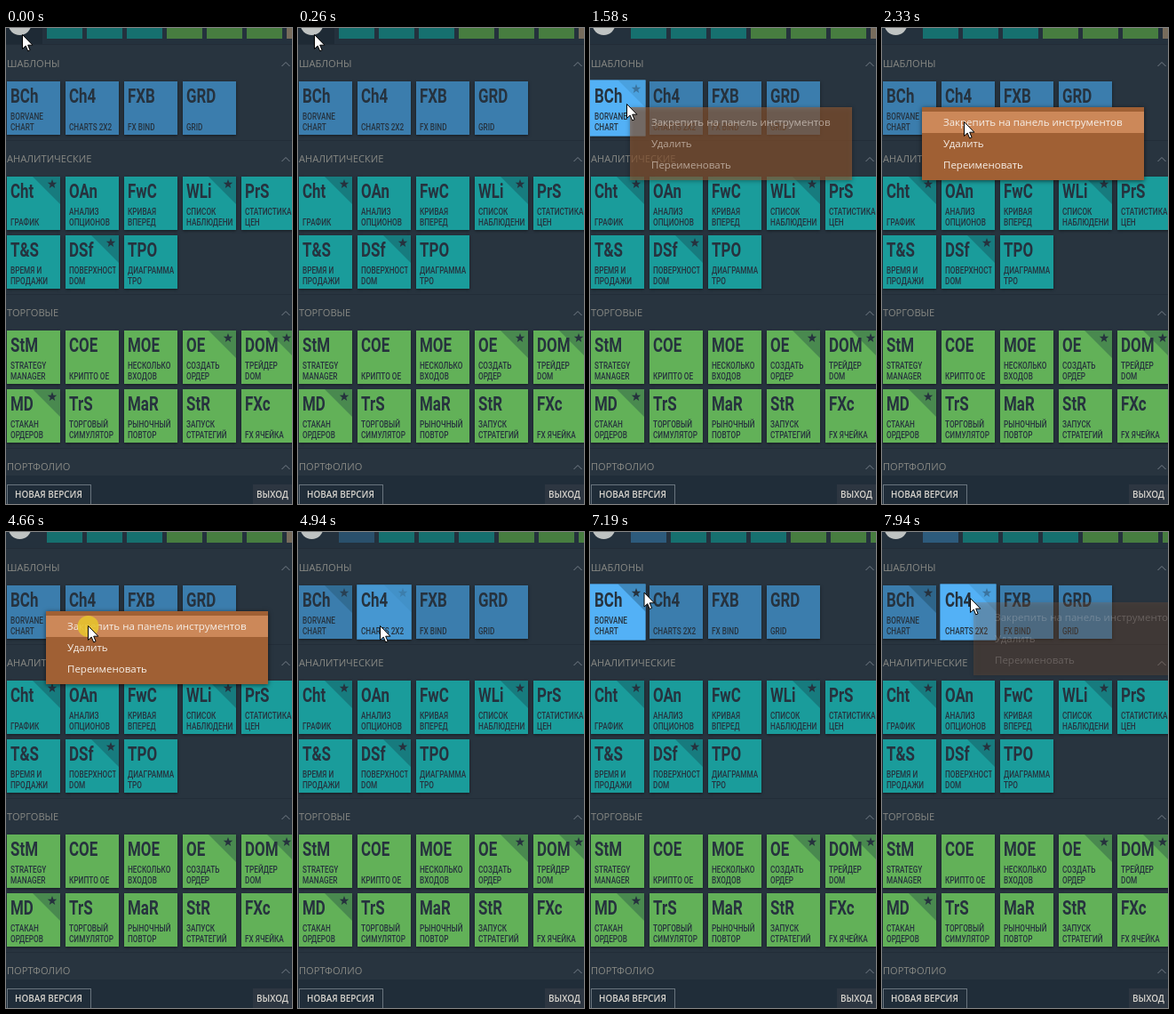
Recreate the animation shown at these times as an HTML page with a canvas. Size 322 by 535 pixels, loop 8 s.

```html
<!DOCTYPE html>
<html lang="ru">
<head>
<meta charset="utf-8">
<style>
  html, body { margin: 0; width: 100%; height: 100%; overflow: hidden; background: #28343f; }
  canvas { display: block; }
</style>
</head>
<body>
<canvas id="stage" width="322" height="535"></canvas>
<script>
const ctx = document.getElementById('stage').getContext('2d');
const LOOP = 8000, TILE = 60, PITCH = 66, CONDENSE = 0.77;
const BLUE = '#3b7dad', TEAL = '#1a9c9b', GREEN = '#62b158', INK = '#26323e';
const SANS = '"Open Sans", "Noto Sans", sans-serif';

// title, label lines, pinned
const rows = [
  { y: 60, color: BLUE, tiles: [
    ['BCh', 'BORVANE|CHART'], ['Ch4', 'CHARTS 2X2'], ['FXB', 'FX BIND'], ['GRD', 'GRID']] },
  { y: 167, color: TEAL, tiles: [
    ['Cht', 'ГРАФИК', 1], ['OAn', 'АНАЛИЗ|ОПЦИОНОВ'], ['FwC', 'КРИВАЯ|ВПЕРЕД'],
    ['WLi', 'СПИСОК|НАБЛЮДЕНИЯ', 1], ['PrS', 'СТАТИСТИКА|ЦЕН']] },
  { y: 233, color: TEAL, tiles: [
    ['T&S', 'ВРЕМЯ И|ПРОДАЖИ'], ['DSf', 'ПОВЕРХНОСТЬ|DOM', 1], ['TPO', 'ДИАГРАММА|TPO']] },
  { y: 340, color: GREEN, tiles: [
    ['StM', 'STRATEGY|MANAGER'], ['COE', 'КРИПТО ОЕ'], ['MOE', 'НЕСКОЛЬКО|ВХОДОВ'],
    ['OE', 'СОЗДАТЬ|ОРДЕР', 1], ['DOM', 'ТРЕЙДЕР|DOM', 1]] },
  { y: 406, color: GREEN, tiles: [
    ['MD', 'СТАКАН|ОРДЕРОВ', 1], ['TrS', 'ТОРГОВЫЙ|СИМУЛЯТОР'], ['MaR', 'РЫНОЧНЫЙ|ПОВТОР'],
    ['StR', 'ЗАПУСК|СТРАТЕГИЙ'], ['FXc', 'FX ЯЧЕЙКА']] }
];
const headers = [['ШАБЛОНЫ', 40], ['АНАЛИТИЧЕСКИЕ', 147], ['ТОРГОВЫЕ', 320], ['ПОРТФОЛИО', 493]];
const menuItems = ['Закрепить на панель инструментов', 'Удалить', 'Переименовать'];
const moves = [
  { from: 550, to: 1040, steps: 8, x: 41, y: 85 },
  { from: 2060, to: 2330, steps: 5, x: 92, y: 105 },
  { from: 5280, to: 5700, steps: 7, x: 43, y: 92 },
  { from: 6300, to: 6580, steps: 5, x: 51, y: 66 },
  { from: 7120, to: 7540, steps: 7, x: 99, y: 74 }
];

// stepped progress: first step lands at `from`, the last one at `to`
function ramp(t, from, to, steps = Math.round((to - from) / 70) + 1) {
  const k = Math.floor((t - from) / (to - from) * (steps - 1) + 1e-6) + 1;
  return Math.max(0, Math.min(1, k / steps));
}
const smooth = p => p * p * (3 - 2 * p);
const mix = (a, b, p) => a + (b - a) * p;

function rect(x, y, w, h, color) {
  ctx.fillStyle = color;
  ctx.fillRect(x, y, w, h);
}
function disc(x, y, r, color) {
  ctx.fillStyle = color;
  ctx.beginPath();
  ctx.arc(x, y, r, 0, Math.PI * 2);
  ctx.fill();
}
function text(str, x, y, font, color) {
  ctx.font = font;
  ctx.fillStyle = color;
  ctx.fillText(str, x, y);
}
function condensed(str, x, y, font) {
  ctx.save();
  ctx.translate(x, y);
  ctx.scale(CONDENSE, 1);
  text(str, 0, 0, font, INK);
  ctx.restore();
}
function polygon(points) {
  ctx.beginPath();
  points.forEach(([x, y]) => ctx.lineTo(x, y));
  ctx.closePath();
}
function withAlpha(alpha, draw) {
  if (alpha <= 0) return;
  ctx.save();
  ctx.globalAlpha *= alpha;
  draw();
  ctx.restore();
}
function shadow(alpha, blur) {
  ctx.shadowColor = `rgba(0,0,0,${alpha})`;
  ctx.shadowBlur = blur;
  ctx.shadowOffsetY = 1;
}

function star(cx, cy) {
  polygon(Array.from({ length: 10 }, (_, i) => {
    const r = i % 2 ? 2.3 : 5.5, a = i * Math.PI / 5 - Math.PI / 2;
    return [cx + r * Math.cos(a), cy + r * Math.sin(a)];
  }));
  ctx.fillStyle = INK;
  ctx.fill();
}

function tile(x, y, color, [title, label], pinned, hover) {
  const grow = 1.5 * hover, side = TILE + 2 * grow;
  const left = x - grow, top = y - grow, right = left + side;
  ctx.save();
  shadow(0.5, 3);
  rect(left, top, side, side, color);
  ctx.restore();
  withAlpha(hover, () => rect(left, top, side, side, '#53b1f6'));

  const mark = Math.max(pinned, hover * 0.4);
  withAlpha(mark * 0.3, () => {
    polygon([[right - 31, top], [right, top], [right, top + 31]]);
    ctx.fillStyle = '#10303c';
    ctx.fill();
  });
  withAlpha(mark, () => star(x + 51, y + 8.5));

  condensed(title, x + 4, y + 23.7, '600 22px Roboto, sans-serif');
  ctx.save();
  ctx.beginPath();
  ctx.rect(x, y, 56.5, TILE);
  ctx.clip();
  const lines = label.split('|');
  lines.forEach((line, i) =>
    condensed(line, x + 4, y + 54.5 - 12 * (lines.length - 1 - i), '500 10.7px Roboto, sans-serif'));
  ctx.restore();
}

function toolbar(t) {
  rect(0, 0, 322, 18, '#24313d');
  withAlpha(1 - ramp(t, 620, 760), () => rect(0, 0, 41, 18, '#1e2a35'));
  rect(0, 18, 322, 1, '#222c37');
  disc(15.5, -5, 13, '#bfc3c2');
  const added = t >= 4800;
  const colors = ['#16706f', '#16706f', '#16706f', '#477d40', '#477d40', '#477d40', '#776c5c'];
  colors.forEach((color, i) => rect(46 + 45 * (i + added), 0, 40, 12, color));
  withAlpha(ramp(t, 4800, 5010), () => rect(46, 0, 40, 12, '#2d5b7c'));
}

function header(name, y) {
  text(name, 1, y + 4, '11.1px ' + SANS, '#888984');
  ctx.strokeStyle = '#77808a';
  ctx.lineWidth = 1;
  ctx.beginPath();
  ctx.moveTo(310.5, y + 3);
  ctx.lineTo(315, y - 1.5);
  ctx.lineTo(319.5, y + 3);
  ctx.stroke();
}

function footer() {
  rect(0, 503, 322, 32, '#202d39');
  ctx.strokeStyle = '#69747e';
  ctx.lineWidth = 1;
  ctx.strokeRect(1.5, 513.5, 94, 22);
  rect(278, 513, 44, 22, '#2d3641');
  text('НОВАЯ ВЕРСИЯ', 10, 528, '600 9.9px ' + SANS, '#d9d6cf');
  text('ВЫХОД', 282, 528, '600 9.9px ' + SANS, '#d9d6cf');
}

function menu(x, y, alpha, highlight) {
  withAlpha(alpha, () => {
    ctx.save();
    shadow(0.6, 5);
    rect(x, y, 250, 82, '#a06034');
    ctx.restore();
    withAlpha(highlight, () => rect(x, y + 5, 250, 24, '#cc8859'));
    menuItems.forEach((item, i) =>
      text(item, x + 24, y + 21 + 24 * i, '11.5px ' + SANS, '#f6efe8'));
  });
}

function cursor(x, y) {
  polygon([[0, 0], [0, 16], [3.7, 12.6], [6.2, 18.4], [8.6, 17.4], [6.2, 11.7], [11.4, 11.7]]
    .map(([dx, dy]) => [x + dx + 0.5, y + dy + 0.5]));
  ctx.fillStyle = '#fff';
  ctx.strokeStyle = '#000';
  ctx.lineWidth = 1;
  ctx.fill();
  ctx.stroke();
}

function pointer(t) {
  return moves.reduce((pos, move) => {
    const p = smooth(ramp(t, move.from, move.to, move.steps));
    return { x: mix(pos.x, move.x, p), y: mix(pos.y, move.y, p) };
  }, { x: 18, y: 7 });
}

function render(t) {
  const pos = pointer(t);
  const hovers = [
    ramp(t, 900, 1040) - ramp(t, 1650, 1790) + ramp(t, 5490, 5700) - ramp(t, 7260, 7470),
    ramp(t, 4870, 5080) - ramp(t, 5420, 5630) + ramp(t, 7330, 7540)
  ];
  const pinned = ramp(t, 4800, 5010);

  rect(0, 0, 322, 535, '#28343f');
  [126, 299, 472].forEach(y => rect(0, y, 322, 1, '#222d38'));
  toolbar(t);
  headers.forEach(([name, y]) => header(name, y));
  footer();

  rows.forEach(({ y, color, tiles }, r) => tiles.forEach((spec, i) => {
    const pin = r === 0 && i === 0 ? pinned : spec[2] || 0;
    tile(1 + PITCH * i, y, color, spec, pin, r === 0 ? hovers[i] || 0 : 0);
  }));

  const firstMenu = Math.max(0, Math.min(1, (t - 1440) / 250)) - ramp(t, 4730, 4940);
  menu(45, 89, firstMenu, ramp(t, 2200, 2330));
  menu(103, 79, Math.max(0, (t - 7885) / 250), 0);

  if (t >= 4660) {
    withAlpha(0.88 * (1 - ramp(t, 4730, 4940)), () => disc(pos.x + 0.5, pos.y + 1, 12, '#e6c32c'));
  }
  cursor(pos.x, pos.y);
}

function frame() {
  render(performance.now() % LOOP);
  requestAnimationFrame(frame);
}
frame();
</script>
</body>
</html>
```
